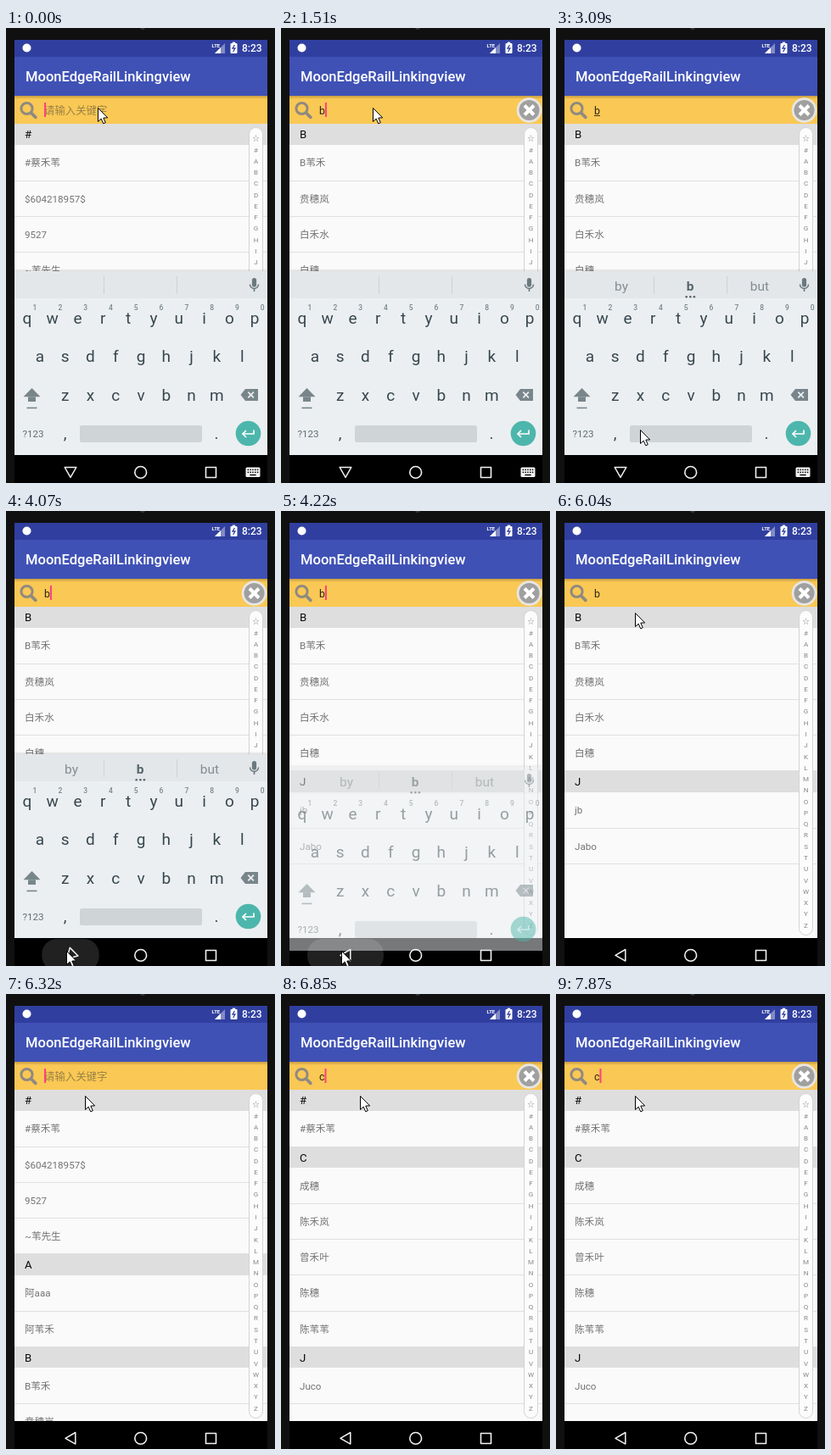
These frames come from a looping animation (317 by 537 pixels, 8 s). An HTML page with a canvas:

```html
<!DOCTYPE html>
<html lang="zh-CN">
<head>
<meta charset="utf-8">
<title>Contact search</title>
<style>
html, body { margin: 0; width: 100%; height: 100%; overflow: hidden; background: #101010; }
canvas { display: block; width: 317px; height: 537px; }
</style>
</head>
<body>
<canvas id="stage"></canvas>
<script>
const W = 317, H = 537, LOOP = 8000;
const LEFT = 10, WIDTH = 298, LIST_TOP = 112.8, NAV_TOP = 504;
const HEADER = 25, ROW = 42.25, KEY = 29.8, KEY_ROW = 45.3;
const SUGGEST = 1670, CLOSE = 4065, BLINK = 500, SHOT = 140;
const FONT = 'Roboto, "Noto Sans CJK SC", "Noto Sans CJK", sans-serif';
const canvas = document.getElementById('stage');
const ctx = canvas.getContext('2d');
const dpr = window.devicePixelRatio || 1;
canvas.width = W * dpr;
canvas.height = H * dpr;

const LISTS = {
  '': [['#', '#蔡禾苇', '$604218957$', '9527', '~苇先生'], ['A', '阿aaa', '阿苇禾'], ['B', 'B苇禾', '贲穗岚']],
  b: [['B', 'B苇禾', '贲穗岚', '白禾水', '白穗'], ['J', 'jb', 'Jabo']],
  c: [['#', '#蔡禾苇'], ['C', '成穗', '陈禾岚', '曾禾叶', '陈穗', '陈苇苇'], ['J', 'Juco']]
};

// Moments that restart the caret, with the query that follows
const INPUTS = [[-380, ''], [1510, 'b'], [CLOSE, 'b'], [6320, ''], [6850, 'c']];

// Pointer stops: time, x, y
const STOPS = [[2810, 108, 94], [3090, 99, 474], [3510, 71, 519], [4350, 71, 519],
  [4630, 141, 344], [4770, 141, 344], [4910, 141, 320], [5050, 98, 177], [5330, 93, 120]];

const clamp = v => Math.min(1, Math.max(0, v));
const easeOut = p => 1 - (1 - p) ** 2;
const lastBefore = (list, t) => list.filter(item => item[0] <= t).pop();

function pointerAt(t) {
  const from = lastBefore(STOPS, t) || STOPS[0];
  const to = STOPS[STOPS.indexOf(from) + 1] || from;
  const p = easeOut(clamp((t - from[0]) / (to[0] - from[0] || 1)));
  return [1, 2].map(i => Math.round(from[i] + (to[i] - from[i]) * p));
}

function rect(x, y, w, h, color) {
  ctx.fillStyle = color;
  ctx.fillRect(x, y, w, h);
}

function stroke(color, width) {
  ctx.strokeStyle = color;
  ctx.lineWidth = width;
  ctx.stroke();
}

function pill(x, y, w, h, r, color) {
  ctx.beginPath();
  ctx.roundRect(x, y, w, h, r);
  ctx.fillStyle = color;
  ctx.fill();
}

function disc(x, y, r, color) {
  pill(x - r, y - r, r * 2, r * 2, r, color);
}

function arc(x, y, r, color, width, end = Math.PI * 2) {
  ctx.beginPath();
  ctx.arc(x, y, r, 0, end);
  stroke(color, width);
}

function trace(points, closed) {
  ctx.beginPath();
  points.forEach(([x, y]) => ctx.lineTo(x, y));
  if (closed) ctx.closePath();
}

function shape(points, color) {
  trace(points, true);
  ctx.fillStyle = color;
  ctx.fill();
}

function line(points, color, width, closed) {
  trace(points, closed);
  stroke(color, width);
}

function cross(x, y, r, color, width) {
  line([[x - r, y - r], [x + r, y + r]], color, width);
  line([[x + r, y - r], [x - r, y + r]], color, width);
}

function text(str, x, y, size, color, weight = 400, align = 'left') {
  ctx.font = `${weight} ${size}px ${FONT}`;
  ctx.textAlign = align;
  ctx.fillStyle = color;
  ctx.fillText(str, x, y);
}

function fade(y, h, from, to) {
  const g = ctx.createLinearGradient(0, y, 0, y + h);
  g.addColorStop(0, from);
  g.addColorStop(1, to);
  rect(LEFT, y, WIDTH, h, g);
}

function drawBars() {
  rect(LEFT, 14, WIDTH, 20, '#303f9f');
  rect(LEFT, 34, WIDTH, 46, '#3f51b5');
  disc(24.5, 23.5, 5, '#fff');
  text('LTE', 242.5, 22.8, 6, '#fff', 700);
  shape([[258, 18], [258, 30], [246, 30]], 'rgba(255,255,255,.4)');
  shape([[253, 23], [253, 30], [246, 30]], '#fff');
  pill(264.5, 18, 8, 12, 1, '#fff');
  rect(266.8, 16.6, 3.4, 2, '#fff');
  line([[269.4, 20], [267, 24], [270, 24], [267.6, 28]], '#303f9f', 1.3);
  text('8:23', 278, 28.2, 12, '#fff', 500);
  text('MoonEdgeRailLinkingview', 23, 63, 16.56, '#fff', 500);
}

function drawSearch(query, caret, underlined) {
  const grey = '#8f8a80';
  rect(LEFT, 80, WIDTH, 33, '#fac854');
  fade(80, 4, 'rgba(60,40,20,.28)', 'rgba(60,40,20,0)');
  arc(24.5, 95, 6.6, grey, 3);
  ctx.lineCap = 'round';
  line([[30, 100.5], [34.8, 105.3]], grey, 3.8);
  ctx.lineCap = 'butt';

  text(query || '请输入关键字', 45, 101.5, 12.4, query ? '#2b2619' : '#9b8147');
  const width = query ? ctx.measureText(query).width : 0;
  if (query) {
    disc(292.5, 97, 14.8, '#e8e6e2');
    disc(292.5, 97, 12, '#a0a0a0');
    cross(292.5, 97, 5.5, '#fff', 4);
  }
  if (underlined) rect(45, 103, width, 1, '#3b3420');
  if (caret) rect(45 + width, 88, 2, 17, '#ff4081');
}

function drawList(groups) {
  rect(LEFT, 113, WIDTH, NAV_TOP - 113, '#fafafa');
  let y = LIST_TOP;
  for (const [title, ...rows] of groups) {
    rect(LEFT, Math.round(y), WIDTH, HEADER, '#dedede');
    text(title, 22, y + 17.5, 13.2, '#0c0c0c');
    y += HEADER;
    for (const row of rows) {
      text(row, 22, y + 25.5, 11.6, '#737373');
      y += ROW;
      rect(LEFT, Math.floor(y), WIDTH, 1, '#e0e0e0');
    }
  }
}

function drawIndex() {
  pill(286.5, 117.5, 16, 383, 8, '#fcfcfc');
  stroke('#d3d3d3', 1);
  [...'☆#ABCDEFGHIJKLMNOPQRSTUVWXYZ'].forEach((c, i) =>
    text(c, 294.5, 133.3 + i * 13.27, 8, '#858585', 400, 'center'));
}

function drawNav(turn, rippleSize, rippleAlpha) {
  const ink = '#f2f2f2';
  rect(LEFT, NAV_TOP, WIDTH, H - NAV_TOP, '#000');
  pill(76 - rippleSize, 505, rippleSize * 2, 38, 18, `rgba(255,255,255,${rippleAlpha})`);
  ctx.lineJoin = 'round';
  ctx.save();
  ctx.translate(76, 524.3);
  ctx.rotate(turn * Math.PI / 2);
  line([[-6.8, -5.8], [6.8, -5.8], [0, 6]], ink, 1.5, true);
  ctx.restore();
  arc(158.7, 524.4, 6.9, ink, 1.6);
  ctx.strokeRect(235.5, 518.5, 12, 12);
  ctx.lineJoin = 'miter';
  if (turn) return;
  pill(282.5, 518.5, 17, 11.5, 1.5, ink);
  for (let i = 0; i < 10; i++)
    rect(284.6 + i % 5 * 2.8, i < 5 ? 520.6 : 523.6, 1.5, 1.5, '#000');
  rect(287.4, 526.8, 7.2, 1.4, '#000');
}

function drawMic(x, y, color) {
  pill(x - 2.6, y - 8, 5.2, 10.5, 2.6, color);
  arc(x, y - 0.5, 5, color, 1.5, Math.PI);
  rect(x - 0.8, y + 4.5, 1.6, 3.5, color);
}

function drawKeys() {
  const ink = '#37474f', soft = '#78868c';
  ['qwertyuiop', 'asdfghjkl', 'zxcvbnm'].forEach((keys, row) => {
    const x = 159 - (keys.length - 1) / 2 * KEY;
    [...keys].forEach((key, i) => text(key, x + i * KEY, 349 + row * KEY_ROW, 19, ink, 400, 'center'));
  });
  for (let i = 0; i < 10; i++)
    text((i + 1) % 10, 34 + i * KEY, 333, 8.5, soft, 500, 'center');

  shape([[30.5, 425], [40.5, 435.3], [20.5, 435.3]], soft);
  rect(26, 435.3, 9, 5.7, soft);
  rect(24.5, 447.6, 12, 1.6, soft);
  shape([[276.5, 433], [282, 426], [297, 426], [297, 440], [282, 440]], soft);
  cross(288.6, 433, 3.3, '#eceff1', 1.7);

  text('?123', 32, 483, 11.6, '#5f6d73', 400, 'center');
  text(',', 69.5, 485, 19, ink, 400, 'center');
  text('.', 248, 485, 19, ink, 400, 'center');
  pill(87, 469, 144, 20, 2.5, '#cfd4d7');

  disc(285.5, 478.5, 14.8, '#4db6ac');
  line([[292, 474.5], [292, 479], [279.5, 479]], '#fff', 1.7);
  line([[283, 475], [279, 479], [283, 483]], '#fff', 1.7);
}

function drawKeyboard(hidden, suggest) {
  ctx.save();
  ctx.globalAlpha = 1 - hidden;
  ctx.translate(0, hidden * 30);
  fade(284, 3, 'rgba(0,0,0,0)', 'rgba(0,0,0,.12)');
  rect(LEFT, 287, WIDTH, 32, '#e3e7ea');
  rect(LEFT, 319, WIDTH, NAV_TOP - 319, '#eceff1');
  rect(115, 293, 1, 21, '#cdd2d5');
  rect(201, 293, 1, 21, '#cdd2d5');
  drawMic(292.5, 303, '#6b797f');
  if (suggest) {
    text('by', 77, 310, 15.5, '#848d92', 400, 'center');
    text('b', 158, 310, 15.5, '#56646b', 700, 'center');
    text('but', 240, 310, 15.5, '#848d92', 400, 'center');
    for (let i = -1; i < 2; i++) disc(158.3 + i * 4.6, 317.3, 1.3, '#56646b');
  }
  drawKeys();
  ctx.restore();
}

function drawPointer(x, y) {
  ctx.save();
  ctx.translate(x + 0.5, y + 0.5);
  const arrow = [[0, 0], [0, 16], [3.7, 12.6], [6.2, 18.3], [8.8, 17.2], [6.3, 11.6], [11.2, 11.4]];
  shape(arrow, '#fff');
  line(arrow, '#000', 1, true);
  ctx.restore();
}

function draw(t) {
  const [since, query] = lastBefore(INPUTS, t);
  const caret = Math.floor((t - since) / BLINK) % 2 === 0;
  // Movement is seen in steps, as in a screen recording
  const shot = 10 + Math.floor((t - 5) / SHOT) * SHOT;
  const hidden = clamp((shot - 4070) / (SHOT * 2));
  const turn = clamp((shot - 3930) / (SHOT * 2));
  const rippleSize = 45 * easeOut(clamp((shot - 4000) / SHOT));
  const rippleAlpha = 0.13 * (1 - clamp((shot - 4210) / (SHOT * 3)));

  ctx.setTransform(dpr, 0, 0, dpr, 0, 0);
  rect(0, 0, W, H, '#101010');
  disc(161, -1, 3, '#34363a');
  drawList(LISTS[query]);
  drawIndex();
  drawBars();
  drawSearch(query, caret, t >= SUGGEST && t < CLOSE);
  drawNav(turn, rippleSize, rippleAlpha);
  if (hidden < 1) drawKeyboard(hidden, t >= SUGGEST);
  drawPointer(...pointerAt(shot));
}

const start = performance.now();
function tick() {
  draw((performance.now() - start) % LOOP);
  requestAnimationFrame(tick);
}
tick();
</script>
</body>
</html>
```
